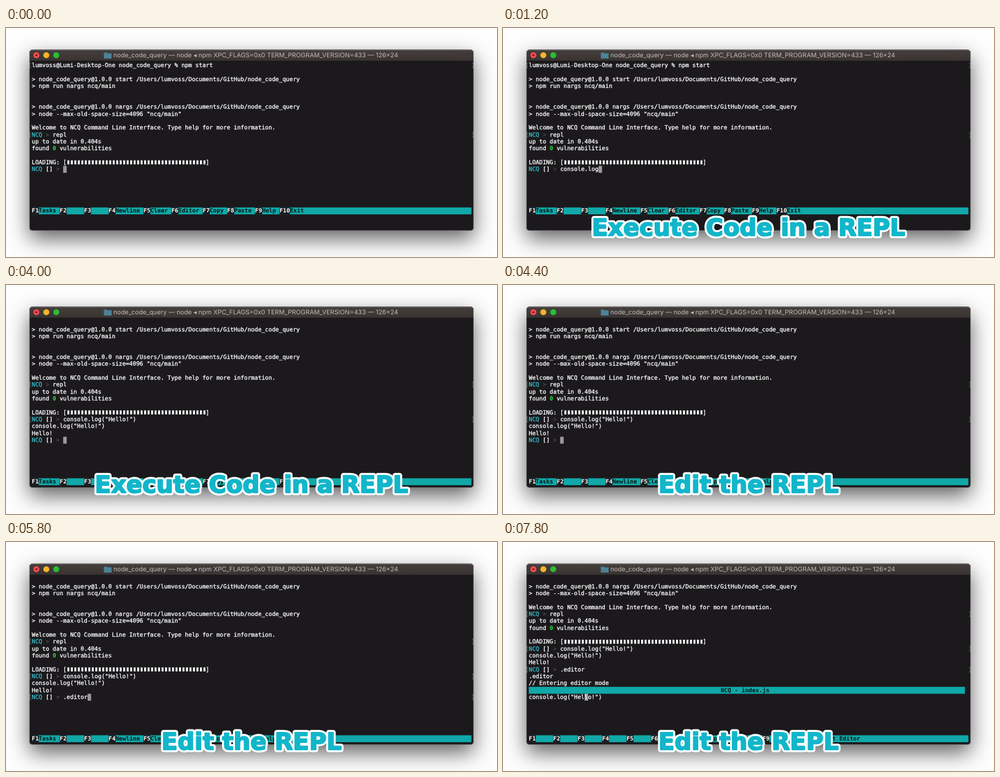
These frames come from a looping animation (800x375 px, 8000 ms). An HTML page with a canvas:

```html
<!DOCTYPE html>
<html lang="en">
<head>
<meta charset="utf-8">
<title>Terminal REPL</title>
<style>
  html, body { margin: 0; width: 100%; height: 100%; overflow: hidden; background: #fefefe; }
  canvas { display: block; width: 800px; height: 375px; }
</style>
</head>
<body>
<canvas id="stage" width="800" height="375"></canvas>
<script>
const ctx = document.getElementById('stage').getContext('2d');
const LOOP = 8000, STEP = 200;
const LEFT = 42, TOP = 55.8, CELL = 5.685, ROW = 11.335, COLUMNS = 126;
const TEAL = '#10a8a8', CYAN = '#36bcc9', WHITE = '#fff', BLACK = '#1b191c';
const MONO = '9.44px "DejaVu Sans Mono", monospace';
const CODE = 'console.log("Hello!")';
const REPL_KEYS = ['Tasks ', '     ', '     ', 'Newline ', 'Clear ', 'Editor ', 'Copy ', 'Paste ', 'Help ', 'Exit'];
const EDITOR_KEYS = [...Array(5).fill(' '.repeat(5)), ' '.repeat(12), 'Copy ', 'Paste    ', ' '.repeat(12), 'Exit Editor'];

const colX = col => LEFT + col * CELL;
const rowY = row => TOP + row * ROW;

function cells(col, row, count, color) {
  ctx.fillStyle = color;
  ctx.fillRect(colX(col), rowY(row), count * CELL, ROW);
}

function put(col, row, text, color = WHITE, bold = false) {
  ctx.font = (bold ? 'bold ' : '') + MONO;
  ctx.fillStyle = ctx.strokeStyle = color;
  ctx.lineWidth = 0.3;
  ctx.fillText(text, colX(col), rowY(row) + 8.6);
  if (!bold) ctx.strokeText(text, colX(col), rowY(row) + 8.6);
}

function marks(row) {
  put(-1, row, '[', '#777');
  put(COLUMNS, row, ']', '#777');
}

function prompt(row, input) {
  put(0, row, 'NCQ', CYAN);
  put(4, row, '[]', WHITE, true);
  put(7, row, '>', '#4c4a4c');
  put(9, row, input);
}

function cursor(col, row) {
  cells(col, row, 1, '#9b999b');
}

function roundBox(x, y, width, height, radius) {
  ctx.beginPath();
  ctx.roundRect(x, y, width, height, radius);
}

function disc(x, y, r, color) {
  ctx.fillStyle = color;
  ctx.beginPath();
  ctx.arc(x, y, r, 0, 7);
  ctx.fill();
}

function windowFrame() {
  ctx.save();
  ctx.shadowColor = 'rgba(0,0,0,.62)';
  ctx.shadowBlur = 34;
  ctx.shadowOffsetY = 13;
  ctx.fillStyle = BLACK;
  roundBox(38, 35.5, 724, 296.5, 5);
  ctx.fill();
  ctx.restore();

  const bar = ctx.createLinearGradient(0, 35, 0, 54);
  bar.addColorStop(0, '#443e3c');
  bar.addColorStop(1, '#3a3431');
  ctx.fillStyle = bar;
  roundBox(38, 35.5, 724, 18, [5, 5, 0, 0]);
  ctx.fill();

  ctx.strokeStyle = 'rgba(255,255,255,.26)';
  ctx.lineWidth = 1;
  roundBox(38.5, 36, 723, 295.5, 4.5);
  ctx.stroke();

  ['#fc4a52', '#f3b428', '#28bf32'].forEach((color, i) => disc(49.5 + 16.2 * i, 44.6, 4.9, color));
  disc(49.5, 44.6, 1.7, '#7c1712');

  ctx.fillStyle = '#3f7389';
  ctx.fillRect(159.5, 40, 5.5, 3);
  ctx.fillStyle = '#4c8297';
  ctx.fillRect(159.5, 41.5, 12.5, 8.5);

  ctx.font = '10.33px Inter, "DejaVu Sans", sans-serif';
  ctx.fillStyle = '#c0bbb9';
  ctx.fillText('node_code_query — node ◂ npm XPC_FLAGS=0x0 TERM_PROGRAM_VERSION=433 — 126×24', 175, 48.4);
}

function keyBar(row, labels) {
  cells(0, row, COLUMNS, TEAL);
  let col = 0;
  labels.forEach((label, i) => {
    const key = 'F' + (i + 1);
    cells(col, row, key.length, BLACK);
    put(col, row, key, WHITE, true);
    put(col + key.length, row, label, '#081616', true);
    col += key.length + label.length;
  });
}

function startupLog(scroll) {
  const path = '/Users/lumvoss/Documents/GitHub/node_code_query';
  const lines = {
    0: 'lumvoss@Lumi-Desktop-One node_code_query % npm start',
    2: '> node_code_query@1.0.0 start ' + path,
    3: '> npm run nargs ncq/main',
    6: '> node_code_query@1.0.0 nargs ' + path,
    7: '> node --max-old-space-size=4096 "ncq/main"',
    9: 'Welcome to NCQ Command Line Interface. Type help for more information.',
    11: 'up to date in 0.404s',
    12: 'found   vulnerabilities',
    14: 'LOADING: [' + ' '.repeat(40) + ']'
  };
  for (const [line, text] of Object.entries(lines)) {
    if (line >= scroll) put(0, line - scroll, text);
  }
  if (scroll === 0) marks(0);
  marks(10 - scroll);
  put(0, 10 - scroll, 'NCQ', CYAN);
  put(4, 10 - scroll, '>', '#4c4a4c');
  put(6, 10 - scroll, 'repl');
  put(6, 12 - scroll, '0', '#2fe03c', true);
  ctx.fillStyle = WHITE;
  for (let i = 0; i < 40; i++) ctx.fillRect(colX(10 + i) + 1.2, rowY(14 - scroll) + 2.2, 3.1, 6.6);
}

function caption(text) {
  ctx.font = 'bold 38.6px "DejaVu Sans", sans-serif';
  ctx.textAlign = 'center';
  ctx.lineJoin = 'round';
  // A wide white outline, then a thin coloured one that thickens the letters.
  for (const [color, width] of [[WHITE, 8.4], ['#12b6ca', 2]]) {
    ctx.strokeStyle = ctx.fillStyle = color;
    ctx.lineWidth = width;
    ctx.strokeText(text, 400, 340);
    ctx.fillText(text, 400, 340);
  }
  ctx.textAlign = 'left';
}

// Typed prefix of text, growing evenly between two times.
function typed(text, t, from, to) {
  const share = Math.min(1, Math.max(0, (t - from) / (to - from)));
  return text.slice(0, Math.floor(text.length * share + 1e-6));
}

function render(t) {
  const evaluated = t >= 4000, editing = t >= 6000;
  const scroll = editing ? 5 : evaluated ? 1 : 0;

  ctx.fillStyle = '#fefefe';
  ctx.fillRect(0, 0, 800, 375);
  windowFrame();
  startupLog(scroll);

  const firstInput = t <= 1200
    ? typed('console.log', t, 0, 1200)
    : 'console.log' + typed('("Hello!")', t, 1200, 2800);
  if (!evaluated) cursor(9 + firstInput.length, 15);
  prompt(15 - scroll, firstInput);
  if (t >= 3800) marks(15 - scroll);

  if (evaluated) {
    const command = typed('.editor', t, 4800, 5600);
    put(0, 16 - scroll, CODE);
    put(0, 17 - scroll, 'Hello!');
    if (!editing) cursor(9 + command.length, 17);
    prompt(18 - scroll, command);
    if (t >= 5800) marks(18 - scroll);
  }

  if (editing) {
    put(0, 14, '.editor');
    put(0, 15, '// Entering editor mode');
    cells(0, 16, COLUMNS - 1, TEAL);
    put(55, 16, 'NCQ - index.js', '#081616', true);
    const movesLeft = Math.min(5, Math.max(0, (t - 6800) / STEP));
    cursor(CODE.length - movesLeft, 17);
    put(0, 17, CODE);
  }

  keyBar(evaluated ? 23 : 21, editing ? EDITOR_KEYS : REPL_KEYS);
  if (t >= 4400) caption('Edit the REPL');
  else if (t >= 600) caption('Execute Code in a REPL');
}

ctx.textRendering = 'geometricPrecision';
const start = performance.now();
function tick() {
  const t = (performance.now() - start) % LOOP;
  render(Math.floor(t / STEP) * STEP);
  requestAnimationFrame(tick);
}
tick();
</script>
</body>
</html>
```
